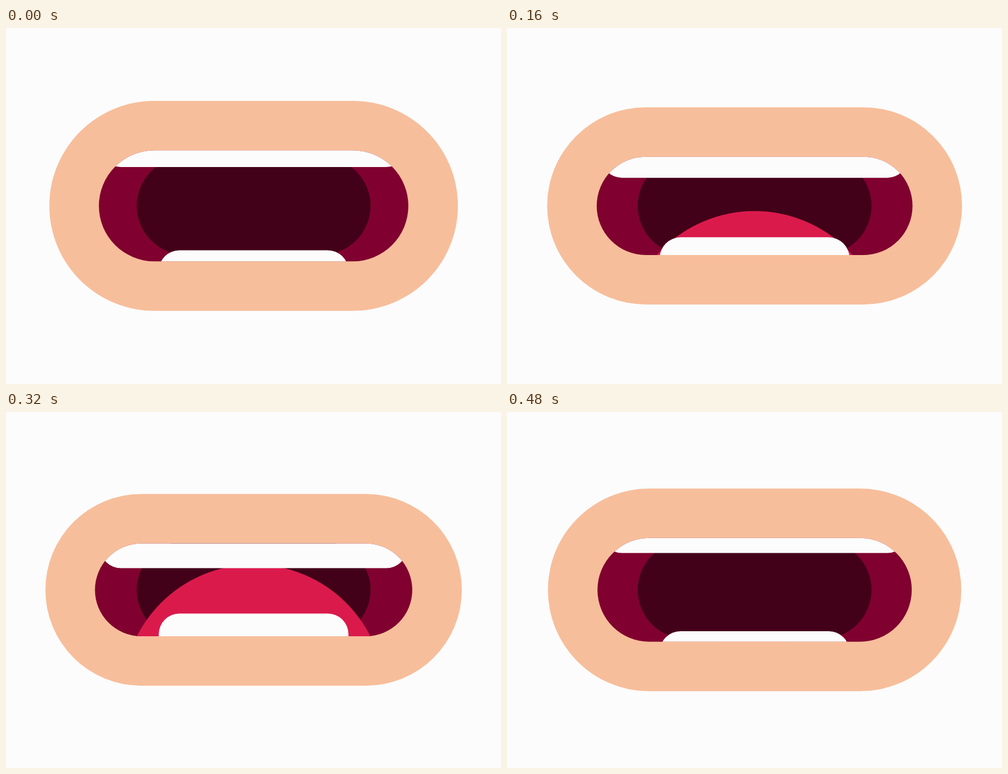
Recreate the animation shown at these times as an HTML page with a canvas. Size 882x635 px, loop 520 ms.

```html
<!DOCTYPE html>
<html lang="en">
<head>
<meta charset="utf-8">
<title>Talking mouth</title>
<style>
  html, body { margin: 0; width: 100%; height: 100%; overflow: hidden; background: #fcfcfc; }
  canvas { display: block; }
</style>
</head>
<body>
<canvas id="stage" width="882" height="635"></canvas>
<script>
const ctx = document.getElementById('stage').getContext('2d');
const CX = 441.2, CY = 317.3;
const LIP = 88.3;
const STEP = 40, STEPS = 13;
const WHITE = '#fcfcfc';

// Keyframes as [step, value], linear in between.
const lipHalfWidth = [[0, 364], [1, 366.5], [2, 368.3], [7, 371.7]];
const lipHalfHeight = [[0, 187.3], [2, 180.8], [7, 168.6]];
const upperTeeth = [[0, 248], [2, 248.3], [6, 286], [7, 285.4], [12, 251.5]];
const lowerTeeth = [[0, 396.5], [1, 396.5], [2, 393.7], [6, 353], [7, 351.5], [12, 391]];
const tongueTop = [[0, 442], [7, 240], [12, 400]];

function at(keys, t) {
  const next = keys.findIndex(([time]) => time >= t);
  if (next === 0) return keys[0][1];
  const [t0, v0] = keys[next - 1], [t1, v1] = keys[next];
  return v0 + (v1 - v0) * (t - t0) / (t1 - t0);
}

function box(color, halfWidth, top, bottom, radii) {
  ctx.fillStyle = color;
  ctx.beginPath();
  ctx.roundRect(CX - halfWidth, top, halfWidth * 2, bottom - top, radii);
  ctx.fill();
}

function pill(color, halfWidth, halfHeight) {
  box(color, halfWidth, CY - halfHeight, CY + halfHeight, halfHeight);
}

function draw(step) {
  const mirrored = Math.min(step, 14 - step);
  const w = at(lipHalfWidth, mirrored), h = at(lipHalfHeight, mirrored);

  ctx.fillStyle = WHITE;
  ctx.fillRect(0, 0, 882, 635);
  pill('#f7be9b', w, h);

  ctx.save();
  pill('#80012f', w - LIP, h - LIP);
  ctx.clip();
  pill('#430019', 208.3, 87);

  const radius = 233;
  ctx.fillStyle = '#db1a4c';
  ctx.beginPath();
  ctx.arc(CX, at(tongueTop, step) + radius, radius, 0, Math.PI * 2);
  ctx.fill();

  box(WHITE, 273.5, 150, at(upperTeeth, step), [0, 0, 37, 37]);
  box(WHITE, 169, at(lowerTeeth, step), 500, [37, 37, 0, 0]);
  ctx.restore();
}

const start = performance.now();
function tick() {
  draw(Math.floor((performance.now() - start) / STEP) % STEPS);
  requestAnimationFrame(tick);
}
tick();
</script>
</body>
</html>
```
